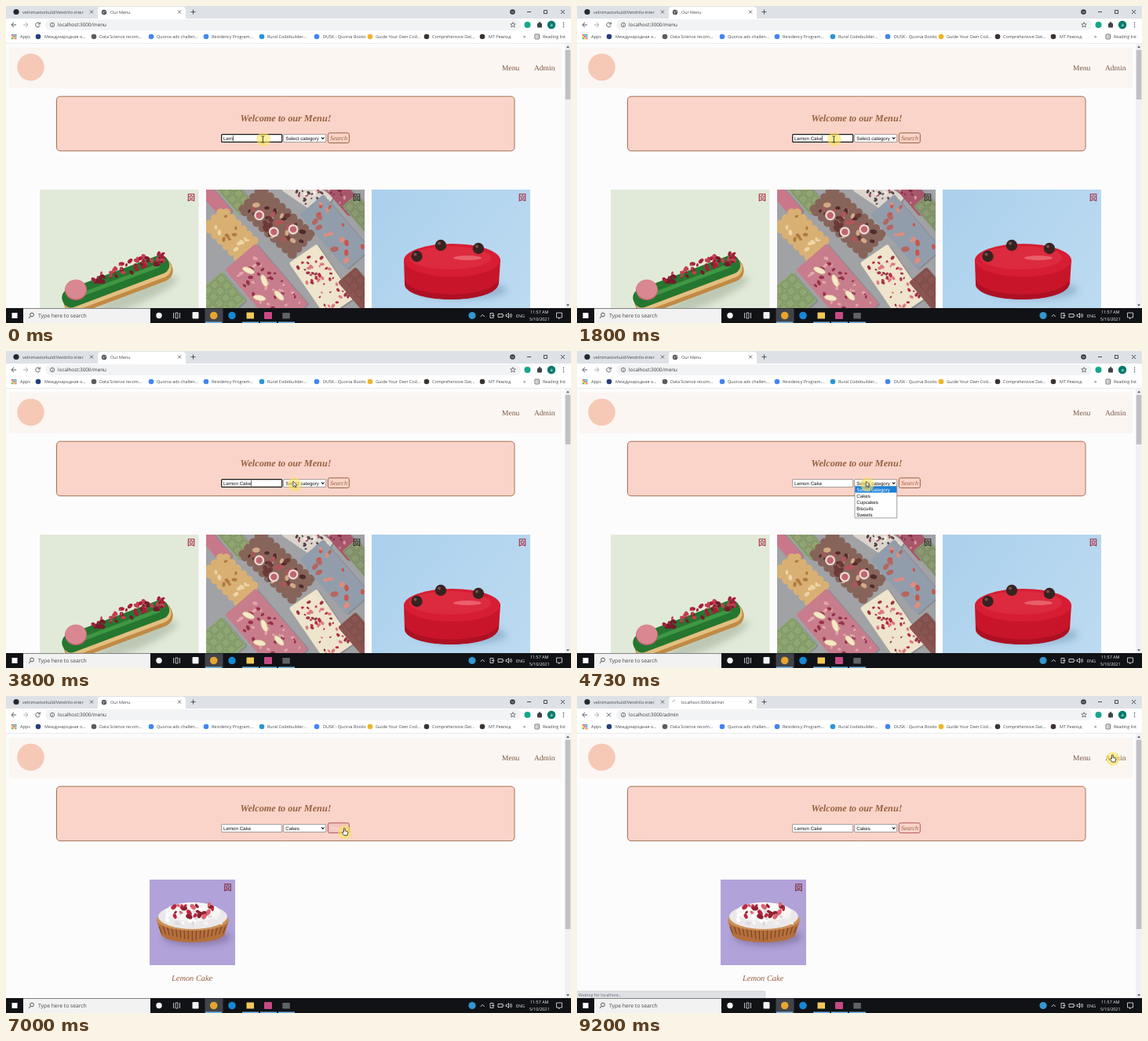
An HTML page with a canvas for the animation above (9270 ms loop, 720x404 px).

```html
<!DOCTYPE html>
<html lang="en">
<head>
<meta charset="utf-8">
<title>Cake menu search</title>
<style>
html, body { margin: 0; width: 100%; height: 100%; overflow: hidden; background: #fdfcfd; }
canvas { display: block; }
</style>
</head>
<body>
<canvas id="stage" width="720" height="404"></canvas>
<script>
const ctx = document.getElementById('stage').getContext('2d');
const LOOP = 9270;
const UI = '"Open Sans", sans-serif';
const SANS = '"Liberation Sans", Arial, sans-serif';
const SERIF = '"Liberation Serif", Times, serif';
const BROWN = '#95603f', RED = '#a8263f', INK = '#45484d';

// Drawing helpers
function paint(fill, stroke, lw) {
  if (fill) { ctx.fillStyle = fill; ctx.fill(); }
  if (stroke) { ctx.strokeStyle = stroke; ctx.lineWidth = lw; ctx.stroke(); }
}
function box(x, y, w, h, fill, r = 0, stroke, lw = 1) {
  ctx.beginPath();
  ctx.roundRect(x, y, w, h, r);
  paint(fill, stroke, lw);
}
function oval(x, y, rx, ry, fill, stroke, lw = 1, turn = 0) {
  ctx.beginPath();
  ctx.ellipse(x, y, rx, ry, turn, 0, 7);
  paint(fill, stroke, lw);
}
function dot(x, y, r, fill, stroke, lw) { oval(x, y, r, r, fill, stroke, lw); }
function shape(d, x, y, fill, stroke, lw = 1) {
  ctx.save();
  ctx.translate(x, y);
  const path = new Path2D(d);
  if (fill) { ctx.fillStyle = fill; ctx.fill(path); }
  if (stroke) { ctx.strokeStyle = stroke; ctx.lineWidth = lw; ctx.stroke(path); }
  ctx.restore();
}
function text(str, x, y, size, fill = INK, family = UI, style = '') {
  ctx.font = `${style} ${size}px ${family}`;
  ctx.fillStyle = fill;
  ctx.fillText(str, x, y);
}
function clipped(x, y, w, h, draw) {
  ctx.save();
  ctx.beginPath();
  ctx.rect(x, y, w, h);
  ctx.clip();
  draw();
  ctx.restore();
}
function turned(x, y, angle, draw) {
  ctx.save();
  ctx.translate(x, y);
  ctx.rotate(angle);
  draw();
  ctx.restore();
}
function shadow(x, y, rx, ry, color, turn = 0) {
  ctx.filter = 'blur(4px)';
  oval(x, y, rx, ry, color, null, 1, turn);
  ctx.filter = 'none';
}
function seeded(seed) {
  return () => (seed = (seed * 16807) % 2147483647) / 2147483647;
}
function scatter(count, w, h, size, colors, seed) {
  const rnd = seeded(seed);
  for (let i = 0; i < count; i++) {
    const s = size * (0.6 + rnd() * 0.7);
    oval((rnd() - 0.5) * w, (rnd() - 0.5) * h, s, s * 0.65, colors[i % colors.length], null, 1, rnd() * 3);
  }
}

// Browser window
function drawTabs(loading) {
  box(0, 0, 720, 16, '#dee1e6');
  box(117, 1, 112, 18, '#fff', 4);
  dot(13, 7.5, 3.6, '#24292e');
  text('velnimastorkuld/Vendrilo-inter', 21, 10, 5.45);
  if (loading) shape('M-3 0A3 3 0 0 1 0 -3', 125, 8, null, '#9aa0a6', 0.8);
  else {
    dot(125, 8, 3.2, '#505458');
    shape('M-2 -1L0 0L-1 2M1 -2L2 0', 125, 8, null, '#dfe2e5', 0.7);
  }
  text(loading ? 'localhost:3000/admin' : 'Our Menu', 133, 10, 5.4);
  for (const x of [109, 221]) shape('M-2 -2L2 2M2 -2L-2 2', x, 7.5, null, INK, 0.8);
  shape('M-3 0H3M0 -3V3', 238.5, 7.5, null, INK, 0.9);
  dot(645.5, 7.5, 3.3, '#3c4043');
  shape('M-1.5 -.6L0 .9L1.5 -.6', 645.5, 7.5, null, '#fff', 0.7);
  shape('M664 7.5H669M685.5 5.5H689.5V9.5H685.5ZM707 5L712 10M712 5L707 10', 0, 0, null, '#222', 0.8);
}

function drawToolbar(loading) {
  box(0, 16, 720, 32, '#fff');
  shape('M13 24H7.5M10 21L7 24L10 27', 0, 0, null, INK, 0.9);
  shape('M22 24H27.5M25 21L28 24L25 27', 0, 0, null, '#a5a8ac', 0.9);
  if (loading) shape('M-2.5 -2.5L2.5 2.5M2.5 -2.5L-2.5 2.5', 40.5, 24, null, INK, 0.9);
  else shape('M2 -2A2.8 2.8 0 1 0 2.8 .6M2.8 -3.5V-1H.3', 40.5, 24, null, INK, 0.9);
  box(50, 17, 606, 14, '#f1f3f4', 7);
  dot(59, 24, 2.7, null, INK, 0.7);
  shape('M0 -1.6V-.9M0 -.2V1.7', 59, 24, null, INK, 0.8);
  text('localhost:3000/' + (loading ? 'admin' : 'menu'), 66, 26.3, 6.3, '#33363a');
  shape('M0 -3.3L1 -1L3.3 -1L1.5 .6L2.2 3L0 1.6L-2.2 3L-1.5 .6L-3.3 -1L-1 -1Z', 646, 24, null, INK, 0.7);
  dot(664.5, 24, 4, '#16a78b');
  box(677, 22, 6, 5.5, '#3f4347', 1);
  dot(680, 21.6, 1.4, '#3f4347');
  dot(695, 24, 5.2, '#00796b');
  text('a', 693.4, 26, 6, '#fff');
  for (const y of [21.5, 24, 26.5]) dot(710.5, y, 0.75, INK);
}

const bookmarks = [
  [41, '#27407c', 'Международная о...', 49],
  [112, '#5b5d60', 'Data Science recom...', 119],
  [185, '#4285f4', 'Quorva ads challen...', 192],
  [255, '#4285f4', 'Residency Program...', 262],
  [326, '#2b95d6', 'Rural Codebuilder...', 333],
  [396, '#4285f4', 'DUSK - Quorva Books', 404],
  [464, '#f0b429', 'Guide Your Own Cod...', 471],
  [536, '#3b3430', 'Comprehensive Dat...', 543],
  [607, '#3b3430', 'МТ Ревлод', 615]
];
function drawBookmarks() {
  const hues = ['#db4437', '#f4b400', '#0f9d58', '#4285f4'];
  for (let i = 0; i < 9; i++) box(7 + i % 3 * 2.3, 36 + Math.floor(i / 3) * 2.3, 1.7, 1.7, hues[(i * 3) % 4]);
  text('Apps', 18, 41, 5.5);
  for (const [x, color, label, left] of bookmarks) {
    dot(x, 39, 3.3, color);
    text(label, left, 41, 5.45);
  }
  text('»', 659, 41, 6.5);
  box(674, 36, 5.5, 6, null, 0.6, INK, 0.8);
  shape('M675.5 38H678.5M675.5 40H678.5', 0, 0, null, INK, 0.6);
  text('Reading list', 684, 41, 5.4);
}

// Page
function drawPageFrame(results) {
  box(0, 48, 720, 337, '#fdfcfd');
  box(0, 47.3, 720, 0.7, '#e2e3e5');
  box(4, 53, 704, 52, '#fbf6f2');
  dot(31.5, 78, 17.3, '#f5c9b6');
  text('Menu', 632, 82, 9.5, '#7a5643', SERIF);
  text('Admin', 673, 82, 9.5, '#7a5643', SERIF);
  box(64.5, 115.2, 583.5, 69.5, '#fbd4c9', 4.5, '#a1714f', 1);
  text('Welcome to our Menu!', 298.5, 147, 12.2, BROWN, SERIF, 'italic bold');
  box(712, 48, 8, 337, '#f1f1f1');
  box(712.7, 56, 6.6, results ? 241 : 63, '#c1c1c1');
  shape('M-2 1.2L0 -1.2L2 1.2Z', 716, 52, '#55585b');
  shape('M-2 -1.2L0 1.2L2 -1.2Z', 716, 381.5, '#55585b');
}

function typed(t) {
  const strokes = [0, 0, 0, 200, 400, 700, 1000, 1200, 1400, 1600];
  return 'Lemon Cake'.slice(0, strokes.filter(s => s <= t).length);
}

function field(x, w, focused) {
  box(x, 163.6, w, 9.8, '#fff', focused ? 1 : 0.5, focused ? '#161616' : '#8a8382', focused ? 1.2 : 0.8);
}

function drawForm(t) {
  const chosen = t >= 5400, inputFocus = t < 4200;
  const hover = t >= 5900 && t < 7300, pressed = t >= 6400;
  const query = typed(t);
  field(274.7, 77, inputFocus);
  text(query, 277, 171, 6.2, '#111', SANS);
  if (inputFocus && (t < 1600 || (t - 1600) % 1060 < 530)) {
    box(277.2 + ctx.measureText(query).width, 165, 0.6, 7.2, '#111');
  }
  field(353.7, 54, chosen && !pressed);
  text(chosen ? 'Cakes' : 'Select category', 356.3, 171, 6.2, '#111', SANS);
  shape('M-1.8 -1L0 1L1.8 -1', 403.7, 168.4, null, '#222', 1.1);
  box(410.3, 161.8, 27, 12.6, hover ? '#f3c4bf' : '#fbd4c9', 2, hover || pressed ? '#b0545a' : BROWN, 1);
  text('Search', 413, 171, 8, hover ? '#fbe4de' : BROWN, SERIF, 'italic');
}

function drawDropdown(t) {
  box(354, 172.4, 53.7, 40.4, '#fff', 0, '#77797c', 0.7);
  const active = t >= 5100 ? 1 : 0;
  ['Select category', 'Cakes', 'Cupcakes', 'Biscuits', 'Sweets'].forEach((label, i) => {
    const y = 172.6 + i * 8;
    if (i === active) box(354.3, y, 53.1, 8, '#1b7fd8');
    text(label, 356.3, y + 6, 6.2, i === active ? '#fff' : '#111', SANS);
  });
}

function ribbon(x, y, color) {
  shape('M-3.7 -4.3H3.7V4.2L0 2.8L-3.7 4.2Z', x, y, null, color, 1.1);
  shape('M0 -3L.7 -1.2L2.5 -1L1.1 .2L1.6 2L0 1L-1.6 2L-1.1 .2L-2.5 -1L-.7 -1.2Z', x, y - 0.2, null, color, 0.8);
}

function drawEclair() {
  box(43, 234, 203, 152, '#e1ead9');
  shadow(165, 369, 58, 11, '#bcc7b4', -0.4);
  turned(143, 354, -0.36, () => {
    box(-74, -13, 146, 31, '#c08a45', 14);
    box(-73, -12, 144, 25, '#e3bf80', 12);
    box(-74, -16, 144, 24, '#25762f', 11);
    box(-60, -6, 118, 5, '#3f9743', 2.5);
  });
  turned(157, 333, -0.3, () => scatter(58, 98, 15, 3.4, ['#a51f37', '#741b2a', '#c43f50'], 17));
  oval(89, 362, 14, 13, '#bd6674');
  oval(89, 361, 13.4, 12.4, '#d98791');
}

function bar(x, y, w, h, color, toppings, angle = 0.86) {
  turned(x, y, angle, () => {
    box(-w / 2 + 2, -h / 2 - 1, w, h, 'rgba(70,70,75,.25)', 3);
    box(-w / 2, -h / 2, w, h, color, 3);
    if (toppings) scatter(toppings.n, w * 0.86, h * 0.8, toppings.size, toppings.colors, toppings.n + 40);
  });
}
function slab(x, y, w, h, color) {
  bar(x, y, w, h, color);
  turned(x, y, 0.86, () => {
    for (let gx = -w / 2 + 2; gx < w / 2 - 8; gx += 11) {
      for (let gy = -h / 2 + 2; gy < h / 2 - 8; gy += 11) box(gx, gy, 9, 9, null, 1, 'rgba(50,50,30,.3)', 0.8);
    }
  });
}
function scalloped(x, y, w, h, color, angle) {
  turned(x, y, angle, () => {
    for (let sx = -w / 2 + 5; sx < w / 2; sx += 10) for (const sy of [-h / 2, h / 2]) dot(sx, sy, 5.4, color);
    for (let sy = -h / 2 + 5; sy < h / 2; sy += 10) for (const sx of [-w / 2, w / 2]) dot(sx, sy, 5.4, color);
    box(-w / 2, -h / 2, w, h, color);
  });
}
function drawChocolate() {
  box(255, 234, 202, 152, '#a0a2a5');
  bar(266, 248, 50, 17, '#c9788a');
  slab(290, 240, 50, 24, '#91a573');
  scalloped(287, 291, 58, 30, '#d9b074', 0.78);
  turned(287, 291, 0.78, () => scatter(16, 48, 24, 3, ['#b07a40', '#edd5a5'], 54));
  scalloped(345, 275, 86, 36, '#87645a', 0.74);
  turned(345, 275, 0.74, () => {
    scatter(34, 82, 34, 3.8, ['#4f2b2b', '#b0555a', '#d3aa86', '#6b3a38'], 71);
    for (const [x, y] of [[-22, 9], [6, 12], [22, -7]]) {
      dot(x, y, 6.5, '#ead9d4');
      dot(x, y, 4.2, '#c0656f');
    }
  });
  bar(384, 239, 60, 30, '#dcd5cd', { n: 45, size: 2, colors: ['#a3475c', '#554342', '#f3eee4'] }, 0.6);
  bar(419, 288, 92, 40, '#929dac', { n: 17, size: 4.2, colors: ['#c9564d', '#e08d7d', '#b5665f'] });
  bar(428, 240, 54, 24, '#a8566a', { n: 20, size: 2.2, colors: ['#d49aa2', '#7d3148'] });
  slab(452, 264, 44, 24, '#8a9a72');
  slab(273, 372, 48, 46, '#8fa873');
  bar(332, 358, 102, 52, '#c77d8c', { n: 50, size: 2.6, colors: ['#96324a', '#e3a5ab'] });
  for (const [x, y, a] of [[309, 337, 0.4], [329, 350, 1.2], [323, 372, 0.2], [348, 369, 0.8]]) {
    oval(x, y, 8, 3.5, '#f4e9c8', '#d9b98a', 0.7, a);
  }
  bar(402, 350, 84, 43, '#efe4cc', { n: 48, size: 2.4, colors: ['#b72d43', '#dc7880', '#9a3444'] }, 0.97);
  slab(451, 362, 52, 30, '#8a5450');
}

function drawRedCake() {
  const sky = ctx.createLinearGradient(466, 234, 668, 386);
  sky.addColorStop(0, '#abd0ec');
  sky.addColorStop(1, '#bddbf1');
  box(466, 234, 202, 152, sky);
  shadow(580, 362, 58, 12, '#94b4d0');
  shape('M507 324L508 354C514 380 621 380 628 354L630 324Z', 0, 0, '#c8152a');
  shape('M508 348C514 374 621 374 628 348L627 356C619 380 515 380 508 356Z', 0, 0, '#ae1023');
  oval(568.5, 324, 61.5, 21, '#d61d33');
  oval(566, 321, 52, 15, '#dc2a3e');
  oval(588, 321, 18, 3, '#e8606c');
  for (const [x, y] of [[523.5, 319], [554, 305], [602, 309]]) {
    dot(x, y, 7.2, '#382321');
    dot(x - 2, y - 2.5, 2, '#75534c');
  }
}

function drawTart() {
  box(183, 234, 109, 109, '#b1a2d9');
  shadow(243, 307, 43, 11, '#8b7cab');
  shape('M192 286L198 305C208 317 268 317 278 305L284 286Z', 0, 0, '#b56f3c');
  for (let i = 0; i < 17; i++) {
    const x = 195 + i * 5.3, drop = 18 - Math.abs(i - 8) * 1.2;
    shape(`M0 0L${(238 - x) * 0.08} ${drop}`, x, 294, null, '#7f4826', 1.3);
  }
  oval(238, 285, 46, 14, '#cc9158');
  oval(238, 281, 44, 16, '#ebe8e9');
  oval(238, 275, 35, 12, '#f9f7f6');
  turned(238, 282, 0, () => scatter(28, 76, 20, 3, ['#fff', '#dfdade', '#f6f2f0'], 31));
  turned(238, 274, 0, () => scatter(24, 54, 17, 3.4, ['#bd2740', '#8e2132', '#d96570'], 12));
  ribbon(282.5, 244, '#7d2930');
  text('Lemon Cake', 211, 363, 10.4, BROWN, SERIF, 'italic');
}

function drawCards() {
  clipped(43, 234, 202.5, 151, drawEclair);
  clipped(255, 234, 202, 151, drawChocolate);
  clipped(466, 234, 202, 151, drawRedCake);
  ribbon(236, 244, RED);
  ribbon(447, 244, '#322c30');
  ribbon(658, 244, RED);
}

// Desktop
function drawTaskbar() {
  box(0, 385, 720, 19, '#101216');
  box(22, 385.5, 162, 18.5, '#f2f2f2');
  box(7.5, 391, 7, 7, '#fff');
  dot(33, 393.5, 2.4, null, '#333', 0.8);
  shape('M31.3 395.3L29 398', 0, 0, null, '#333', 0.9);
  text('Type here to search', 41, 397, 6.75, '#444');
  dot(195, 394.5, 3.7, '#f5f5f5');
  shape('M213.5 391V398M216 391H219V398H216ZM221.5 391V398', 0, 0, null, '#e6e6e6', 0.8);
  box(253.5, 385.5, 23, 18.5, '#41444a');
  box(237.5, 390, 8, 8.5, '#f3f3f3', 1);
  dot(264.7, 394.5, 4.8, '#e5a52f');
  dot(288, 394.5, 4.8, '#1688d4');
  box(306.5, 390.5, 9.5, 8, '#f2c85b', 0.5);
  box(329, 390, 10, 9, '#c84a83', 1);
  box(352.3, 391, 9.5, 7.5, '#606266', 0.5);
  for (const x of [254, 301, 324, 347]) box(x, 402.5, 21, 1.5, '#75b6e7');
  dot(594, 394.5, 4.6, '#3496cf');
  shape('M604.8 396L607.3 393.3L609.8 396M617 391.5H621V397.5H617ZM619 394.5H622.5', 0, 0, null, '#eee', 0.8);
  shape('M627 392.5H633V396.5H627ZM634 393.7V395.3M637 393.5H638.5L640.5 391.5V397.5L638.5 395.5H637ZM642 392.7Q643.5 394.5 642 396.3M643.5 391.8Q645.7 394.5 643.5 397.2', 0, 0, null, '#eee', 0.8);
  text('ENG', 650, 397, 5.4, '#f2f2f2');
  text('11:57 AM', 668, 392.4, 5.4, '#f2f2f2');
  text('5/10/2021', 667, 401, 5.4, '#f2f2f2');
  shape('M701.5 391H708.5V397H706L704.5 398.8V397H701.5Z', 0, 0, null, '#eee', 0.8);
}

const route = [
  [0, 328, 170], [3200, 328, 170], [3900, 370, 170], [4900, 370, 170], [5300, 366, 185],
  [5500, 366, 185], [6000, 432, 173.5], [7200, 432, 173.5], [7900, 662, 86], [8200, 662, 86],
  [8700, 683, 80], [LOOP, 683, 80]
];
function pointerAt(t) {
  const i = route.findIndex(p => p[0] > t);
  const [t0, x0, y0] = route[i - 1], [t1, x1, y1] = route[i];
  const u = (t - t0) / (t1 - t0), e = u * u * (3 - 2 * u);
  return [x0 + (x1 - x0) * e, y0 + (y1 - y0) * e];
}

function drawPointer(x, y) {
  dot(x, y, 8.7, 'rgba(250,226,84,.6)');
  const inForm = y > 162 && y < 175;
  if (inForm && x < 352) {
    shape('M-1.8 -4H-.6L0 -3.4L.6 -4H1.8M0 -3.4V3.4M-1.8 4H-.6L0 3.4L.6 4H1.8', x - 0.7, y, null, '#222', 0.9);
  } else if ((inForm && x > 410 && x < 438) || (x > 672 && y < 90)) {
    shape('M-1.5 .5V-4.2Q-.6 -5.2 .2 -4.2V-1.2L3 -.4Q4 0 3.7 1.5L3 4.5H-1.2L-3.7 1Q-3.4 -.6 -1.5 .5Z', x, y - 0.4, '#fff', '#222', 0.8);
  } else {
    shape('M0 0V7.2L1.7 5.7L2.8 8L3.9 7.5L2.8 5.2H5Z', x - 1.7, y - 4, '#fff', '#222', 0.7);
  }
}

function drawStatus(label) {
  box(-2, 376, 242, 11, '#dfe1e5', 2, '#c9cbcf', 0.6);
  text(label, 2, 382.5, 5.3, '#5f6368');
}

function draw(t) {
  const results = t >= 6600, loading = t >= 9100;
  const [x, y] = pointerAt(t);
  ctx.textRendering = 'geometricPrecision';
  drawTabs(loading);
  drawToolbar(loading);
  drawBookmarks();
  drawPageFrame(results);
  drawForm(t);
  if (results) drawTart();
  else drawCards();
  if (t >= 4200 && t < 5400) drawDropdown(t);
  if (loading) drawStatus('Waiting for localhost...');
  else if (x > 672 && y < 90) drawStatus('localhost:3000/admin');
  drawTaskbar();
  drawPointer(x, y);
}

// Pictures alternate between 130 and 70 ms
let shown = -1;
function tick() {
  const now = performance.now() % LOOP;
  const t = Math.floor(now / 200) * 200 + (now % 200 >= 130 ? 100 : 0);
  if (t !== shown) draw(shown = t);
  requestAnimationFrame(tick);
}
tick();
</script>
</body>
</html>
```
